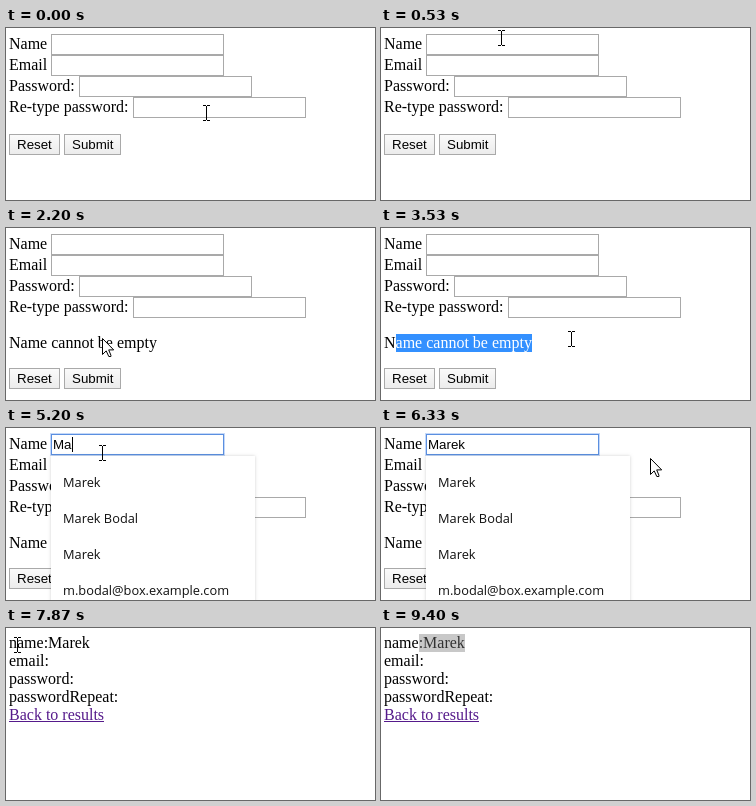
These frames come from a looping animation (369x172 px, 9540 ms). An HTML page with a canvas:

```html
<!DOCTYPE html>
<html lang="en">
<head>
<meta charset="utf-8">
<title>Form validation</title>
<style>
  html, body { margin: 0; width: 100%; height: 100%; overflow: hidden; background: #fff; }
  canvas { display: block; }
</style>
</head>
<body>
<canvas id="stage" width="369" height="172"></canvas>
<script>
const ctx = document.getElementById('stage').getContext('2d', { alpha: false });
const LOOP = 9540, TICK = 1000 / 15;
const SERIF = '16px "Liberation Serif", serif';
const SANS = '13.33px "Liberation Sans", sans-serif';
const MENU = '500 12.8px "Open Sans", sans-serif';
const NAME = 'Marek', FULL = 'Marek Bodal', MAIL = 'm.bodal@box.example.com';
const ERROR = 'Name cannot be empty';
const SELECTED = '#3390ff';

const within = (t, from, to) => t >= from && t < to;
const clamp = (v, lo, hi) => Math.min(hi, Math.max(lo, v));

// Each move glides the pointer to a spot and takes on that spot's shape halfway
const start = { x: 200, y: 85, beam: true };
const moves = [];
const arrowTo = (from, to, x, y) => moves.push({ from, to, x, y, beam: false });
const beamTo = (from, to, x, y) => moves.push({ from, to, x, y, beam: true });
arrowTo(0, 200, 96, 113);       // pass over Submit
beamTo(200, 530, 120, 10);      // Name field
arrowTo(1200, 1530, 312, 18);   // click aside
arrowTo(1530, 1930, 96, 110);   // Submit
beamTo(2660, 2930, 19, 115);    // error text
beamTo(3130, 3530, 190, 111);   // drag across it
beamTo(3860, 4070, 96, 25);     // Name field
arrowTo(6000, 6400, 283, 30);   // click aside
arrowTo(6460, 7000, 99, 143);   // Submit
beamTo(7530, 7870, 11, 17);     // result text
beamTo(7870, 8070, 41, 14);
beamTo(8260, 8530, 95, 13);     // drag across it
arrowTo(8730, 9130, 134, 190);  // leave the page

function pointer(t) {
  let spot = start;
  for (const move of moves) {
    const p = clamp((t - move.from) / (move.to - move.from), 0, 1);
    const ease = p * p * (3 - 2 * p);
    spot = {
      x: spot.x + (move.x - spot.x) * ease,
      y: spot.y + (move.y - spot.y) * ease,
      beam: p > .5 ? move.beam : spot.beam
    };
  }
  return { x: Math.round(spot.x), y: Math.round(spot.y), beam: spot.beam };
}

function rect(x, y, w, h, color) {
  ctx.fillStyle = color;
  ctx.fillRect(x, y, w, h);
}

function box(x, y, w, h, fill, border) {
  rect(x, y, w, h, border);
  rect(x + 1, y + 1, w - 2, h - 2, fill);
}

function text(str, x, y, font = SERIF, color = '#000') {
  ctx.font = font;
  ctx.fillStyle = color;
  ctx.fillText(str, x, y);
}

function width(str, font) {
  ctx.font = font;
  return ctx.measureText(str).width;
}

// Highlights from character `first` up to the character edge nearest `toX`
function select(str, x, y, first, toX, back, color) {
  const edge = n => x + width(str.slice(0, n), SERIF);
  let last = first;
  while (last < str.length && (edge(last) + edge(last + 1)) / 2 <= toX) last++;
  const left = Math.round(edge(first)), right = Math.round(edge(last));
  ctx.save();
  ctx.beginPath();
  ctx.rect(left, y - 14, right - left, 18);
  ctx.clip();
  rect(left, y - 14, right - left, 18, back);
  text(str, x, y, SERIF, color);
  ctx.restore();
}

function field(label, x, y) {
  text(label, 3, y + 15);
  box(x, y, 173, 21, '#fff', '#a9a9a9');
}

function button(label, x, y, w, mouse) {
  const hover = within(mouse.x, x, x + w) && within(mouse.y, y, y + 21);
  const fill = ctx.createLinearGradient(0, y, 0, y + 21);
  fill.addColorStop(0, '#fbfbfb');
  fill.addColorStop(1, '#ebebeb');
  box(x, y, w, 21, fill, hover ? '#707070' : '#a9a9a9');
  text(label, x + 8, y + 15, SANS);
}

function menu(typed) {
  const all = [NAME, 'English', FULL, NAME, MAIL];
  const items = all.filter(s => s.toLowerCase().includes(typed.charAt(0).toLowerCase()));
  ctx.save();
  ctx.shadowColor = 'rgba(0,0,0,.18)';
  ctx.shadowBlur = 3;
  rect(45, 28, typed ? 204 : 192, items.length * 36 + 16, '#fff');
  ctx.restore();
  items.forEach((item, i) => text(item, 57, 59 + i * 36, MENU, '#111'));
}

function focusRing() {
  box(44, 5, 175, 23, '#fff', '#c4d8f8');
  box(45, 6, 173, 21, '#fff', '#5b8fe0');
}

function form(t, mouse) {
  field('Name', 45, 6);
  field('Email', 45, 27);
  field('Password:', 73, 48);
  field('Re-type password:', 127, 69);

  const message = t < 2060 ? '' : within(t, 2200, 7130) ? ERROR : 'Sending....';
  text(message, 3, 120);
  if (within(t, 3200, 4330)) select(ERROR, 3, 120, 1, mouse.x, SELECTED, '#fff');
  const y = message ? 140 : 106;
  button('Reset', 3, y, 51, mouse);
  button('Submit', 58, y, 57, mouse);

  const typed = t < 5130 ? '' : NAME.slice(0, 1 + Math.round((t - 5130) / 100));
  const focus = t < 4330 ? 930 : 4330, blur = t < 4330 ? 1530 : 6460;
  if (within(t, focus, blur)) {
    focusRing();
    const lastKey = typed ? clamp(t, 5130, 5530) : focus;
    if ((t - lastKey) % 1060 < 530) rect(Math.round(47 + width(typed, SANS)), 9, 1, 15, '#000');
  }
  text(typed, 47, 21, SANS);
  if (within(t, focus, blur + 60)) menu(typed);
}

function results(t, mouse) {
  const first = 'name:' + NAME;
  const link = 'Back to results';
  [first, 'email:', 'password:', 'passwordRepeat:'].forEach((s, i) => text(s, 3, 20 + i * 18));
  text(link, 3, 92, SERIF, '#551a8b');
  rect(3, 93, Math.round(width(link, SERIF)), 1, '#551a8b');
  if (t >= 9400) select(first, 3, 20, 4, Infinity, '#c8c8c8', '#323232');
  else if (t >= 8330) select(first, 3, 20, 4, t < 8530 ? mouse.x : Infinity, SELECTED, '#fff');
}

function drawPointer({ x, y, beam }) {
  if (beam) {
    rect(x, y - 7, 1, 14, '#000');
    for (const dy of [-8, 7]) {
      rect(x - 3, y + dy, 3, 1, '#000');
      rect(x + 1, y + dy, 3, 1, '#000');
    }
    return;
  }
  ctx.save();
  ctx.translate(x + .5, y + .5);
  const arrow = new Path2D('M0 0V16L3.7 12.4L6.3 18H8.4V16.7L6.2 11.4H11.2Z');
  ctx.fillStyle = '#fff';
  ctx.fill(arrow);
  ctx.strokeStyle = '#000';
  ctx.lineWidth = 1;
  ctx.stroke(arrow);
  ctx.restore();
}

function draw(now) {
  // The screen refreshes 15 times a second
  const t = Math.floor((now % LOOP + 5) / TICK) * TICK;
  const mouse = pointer(t);
  rect(0, 0, 369, 172, '#fff');
  (t < 7330 ? form : results)(t, mouse);
  drawPointer(mouse);
}

const begin = performance.now();
function loop() {
  draw(performance.now() - begin);
  requestAnimationFrame(loop);
}
loop();
</script>
</body>
</html>
```
